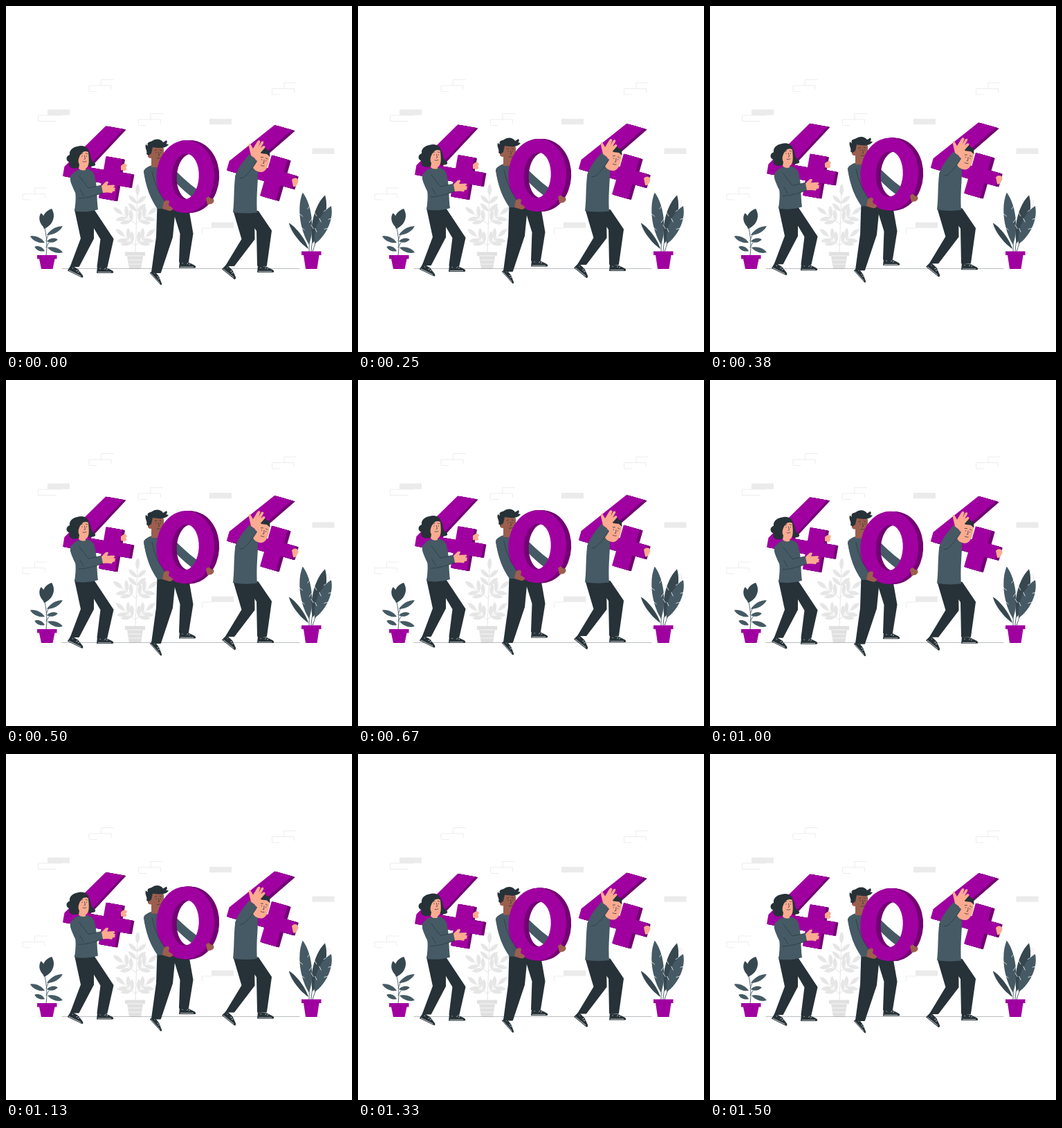
Write an HTML page that moves like this. It is 500 px wide and 500 px high and loops after 1.54 s.

```html
<!DOCTYPE html>
<html lang="en">
<head>
<meta charset="utf-8">
<title>404</title>
<style>
  html, body { margin: 0; width: 100%; height: 100%; overflow: hidden; background: #fff; }
  svg { display: block; width: 100vw; height: 100vh; }
  .purple { fill: #a000a0; }
  .shade { fill: #730073; }
  .cloth { fill: #455a64; }
  .slate { fill: #37474f; }
  .dark { fill: #263238; }
  .skin { fill: #fcab90; }
  .brown { fill: #9c5f4e; }
  .brick { fill: #ebebeb; }
  .pale { fill: #e6e6e6; }
  .pot { fill: #e0e0e0; }
  .leg { fill: #263238; stroke: #263238; stroke-width: 2; stroke-linejoin: round; }
  .wall, .fold, .line, .stem, .floor, .palestem, .cut { fill: none; stroke-linecap: round; stroke-linejoin: round; }
  .wall { stroke: #e6e6e6; stroke-width: .7; }
  .fold { stroke: #263238; stroke-width: .6; }
  .line { stroke: #263238; stroke-width: .7; }
  .stem { stroke: #455a64; stroke-width: .9; }
  .palestem { stroke: #e6e6e6; }
  .floor { stroke: #a7adb0; stroke-width: .8; }
  .cut { stroke: #fff; stroke-width: .7; }
</style>
</head>
<body>
<svg viewBox="0 0 500 500"><g id="scene"></g><g id="crew"></g></svg>
<script>
const LOOP = 1540, LIFT = 6, PHASE = 0.23;

const path = (cls, d, at = "") => `<path class="${cls}" d="${d}" transform="${at}" fill-rule="evenodd"/>`;
const repeat = (n, make) => Array.from({ length: n }, (_, i) => make(i)).join("");
const oval = (rx, ry) => `M${-rx} 0a${rx} ${ry} 0 1 1 ${2 * rx} 0a${rx} ${ry} 0 1 1 ${-2 * rx} 0Z`;

// Room
const brick = (x, y) => path("brick", `M${x} ${y}h32v8.300h-32z`);

// Two staggered bricks in outline, the upper one shifted right.
const outline = (x, y) => path("wall", `M${x} ${y + 16.5}V${y + 8.5}H${x + 17.5}V${y}H${x + 35}M${x + 17.5} ${y + 8.5}H${x + 32}V${y + 14}M${x + 1} ${y + 17}h10`);

function pot(cls, x, y, w, h) {
  return path(cls, `M${x} ${y}h${w}v5.500h-3l-3 ${h - 5.5}h${12 - w}l-3 ${5.5 - h}h-3z`);
}

// Plants
function leaf(cls, x, y, angle, len, w, cuts = 0) {
  const at = `translate(${x} ${y}) rotate(${angle})`;
  const nicks = repeat(cuts, i => {
    const side = i % 2 ? 1 : -1;
    return path("cut", `M${len * (.35 + i * .13)} ${side * w * .78}l${-len * .06} ${-side * w * .4}`, at);
  });
  return path(cls, `M0 0C${len * .3} ${-w} ${len * .75} ${-w} ${len} 0C${len * .75} ${w} ${len * .3} ${w} 0 0Z`, at) + nicks;
}

// A twig with leaf pairs on the part beyond `from`, and one leaf at the tip.
function twig(x, y, angle, len, pairs, from = .3) {
  const a = angle * Math.PI / 180, dx = Math.cos(a) * len, dy = Math.sin(a) * len;
  return path("palestem", `M${x} ${y}l${dx} ${dy}`) +
    leaf("pale", x + dx, y + dy, angle, 17, 4) +
    repeat(pairs * 2, i => {
      const t = from + (1 - from) * (i >> 1) / pairs;
      return leaf("pale", x + dx * t, y + dy * t, angle + (i % 2 ? 48 : -48), 17, 4);
    });
}

const palePlant = () =>
  twig(187, 356, -88, 82, 2, .72) +
  [-1, 1].map(side => {
    const turn = deg => -90 + side * deg;
    return twig(187, 315, turn(53), 23, 2) + twig(187, 346, turn(50), 20, 2);
  }).join("") +
  pot("pot", 172, 355.5, 29, 24.5) +
  repeat(3, i => path("cut", `M${176 + i} ${361 + i * 6}H${197 - i}`));

const leftPlant = () =>
  path("stem", "M58 361Q61 340 55 316M58 349Q62 340 66 339M58 339Q61 328 66 325") +
  leaf("cloth", 59, 331, -29, 26, 4.5) + leaf("cloth", 56, 342, -156, 23, 4.5) +
  leaf("cloth", 59, 340, -10, 16, 4) + leaf("cloth", 56, 354, -157, 16, 4) +
  leaf("cloth", 60, 349, 18, 23, 4.5) +
  leaf("slate", 54, 319, -100, 20, 5) + leaf("slate", 55, 322, -69, 31, 10) +
  pot("purple", 45, 360, 28.5, 20);

const rightPlant = () =>
  path("stem", "M438 355Q439 345 437 335M441 355Q442 340 445 330M443 355Q447 342 451 332") +
  leaf("cloth", 438, 345, -97, 76, 11, 4) + leaf("slate", 443, 343, -75.5, 72, 11, 4) +
  leaf("cloth", 446, 344, -66.5, 60, 11, 4) + leaf("slate", 437, 351, -127, 47, 5) +
  pot("purple", 427, 354.5, 28.5, 25.5);

// Digits: the side is the face repeated along its depth.
function solid(d, at, depth) {
  const layer = (cls, x) => path(cls, d, `${at} translate(${x} 0)`);
  return repeat(depth, i => layer("shade", depth - i)) + layer("purple", 0);
}
const four = (x, y, tilt, depth) =>
  solid("M0 0H26L-15 63H8V43H32V62H49V81.500H32V104H8V82H-48.500V68Z", `translate(${x} ${y}) rotate(${tilt})`, depth);
const zero = () => solid(oval(42, 52.5) + oval(19.5, 33), "translate(259.200 246.500) rotate(3)", 7);

// People; a joint is [x, y, half width].
function leg(...joints) {
  const left = joints.map(([x, y, w]) => `${x - w + 1} ${y}`);
  const right = joints.map(([x, y, w]) => `${x + w - 1} ${y}`).reverse();
  return path("leg", `M${[...left, ...right].join("L")}Z`);
}
function shoe(x, y, tilt, thick = 1) {
  const at = `translate(${x} ${y}) rotate(${tilt}) scale(1 ${thick})`;
  return path("dark", "M1 0L13 1 23 6Q26 9.500 22 9.500H0Z", at) +
    path("cut", "M5 3h.5M12 4l1-1.500M15 5l1-1.500M2 8.300H21", at + " scale(.98)");
}
const face = (x, y, tilt) =>
  path("line", "M-5-4l3-1M2-5l3 .7M-3-1.500v.8M3.500-1.500v.8M.5-2l1 5-1.500.5M-2 7q2.500 1 5-.5", `translate(${x} ${y}) rotate(${tilt})`);

const woman = () =>
  four(144, 173.5, 10, 4) +
  path("skin", "M166 231Q171 226 174 229 176 231 173 233 176 236 172 238L166 237Z") +
  leg([119, 294, 8], [146, 337, 9.5], [139, 377, 7.5]) +
  leg([113, 294, 14], [117.5, 336, 9.5], [99.5, 376, 6.5]) +
  shoe(93, 374, 26) + shoe(131, 376.5, 0) +
  path("cloth", "M93 248C96 239 105 235 114 235 124 236 128 241 129 250 132 263 131 281 133 294Q118 299 99 296.500C101 282 101 275 100 268 96 260 92 254 93 248Z") +
  path("dark", "M103 203C112 200 119 204 120 211 124 215 121 222 127 226 132 229 128 233 121 231L104 234C95 237 89 231 92 226 86 224 86 217 92 215 91 208 97 204 103 203Z") +
  path("skin", "M105 213C108 206 118 207 119 212 120 222 121 232 115 235V237Q109 239 105 235L106 229C103 224 104 218 105 213Z") +
  path("dark", "M103 205C113 201 119 206 119 211 113 208 109 212 106 218 103 225 106 230 102 232 95 233 94 207 103 205Z") +
  face(113, 218, 0) +
  path("cloth", "M93 249C92 242 101 239 107 247L119 263 138 259 140.500 270C129 274 116 279 107 277.500 100 273 95 260 93 249Z") +
  path("fold", "M106 246L119 263 138 259M107 265l5 9M105 278Q118 278 140 270") +
  path("skin", "M138 260L144 254Q148 253 148 255L146 259 156 258.500Q159 260 155 262 160 263 157 265 159 268 154 268L153 270.500Q147 269 140 270Z");

const middle = () =>
  leg([252, 292, 12], [261, 329, 9.5], [257, 369.5, 7]) +
  leg([232, 288, 13.5], [229, 334, 12], [217, 385, 7]) +
  shoe(213, 381, 48, .75) + shoe(250, 369, 0) +
  path("cloth", "M199 239C202 233 208 230 214 230L242 238 243 293 219 293C211 283 202 262 199 239Z") +
  path("cloth", "M235 231C246 237 257 251 272 262L294 279 289 288C272 280 260 270 244 254Z") +
  path("brown", "M206 206C213 198 225 200 228 206 229 218 226 230 221 233H210V220Q204 220 205 215 206 212 208 214Z") +
  path("dark", "M206 216L203 214C205 209 200 206 202 200L205 202C203 196 208 197 211 195 217 191 224 192 227 197L232 194Q234 198 231 199L235 200C231 206 222 206 212 204L210 213Z") +
  face(220, 213, 0) + zero() +
  path("cloth", "M199 239C200 233 208 232 211 238L219 266 231 284 226 293C214 290 205 274 199 239Z") +
  path("fold", "M211 239Q215 262 230 283") +
  path("brown", "M228 283Q233 279 236 282L235 288 241 292Q241 296 236 296L226 293ZM289 278Q293 273 296 278L300 279Q302 283 297 286L291 287Z");

const last = () =>
  four(388, 172, 16, 5) +
  path("skin", "M413 251Q417 247 421 249.500 424 253 421 257 419 262 415 261Z") +
  leg([354, 297, 11], [373, 325, 11], [370, 375, 7]) +
  leg([344, 298, 15], [350, 337, 9.5], [324, 375, 6.5]) +
  shoe(318, 373, 39) + shoe(363, 375.5, 0) +
  path("cloth", "M331 248C334 237 342 227 351 221L363 232C366 246 361 270 363 298.500Q346 301 328 298C330 282 329 266 331 248Z") +
  path("skin", "M362 216C368 208 380 209 381 216 381 229 376 239 370 240 361 241 354 233 357 227Z") +
  path("dark", "M366 210L375 205 377 208 381 209 381.500 218 377 214 369 213Z") +
  face(372, 224, 16) +
  path("cloth", "M331 246C336 232 345 222 352 214L363 224C358 233 350 243 344 248 338 250 331 249 331 246Z") +
  path("fold", "M362 225Q353 240 343 248L338 249") +
  path("skin", "M354 216L351 203Q350 198 353 199L357 206 363 196Q366 192 367.500 196L365 203 369 196Q373 194 372 198L368 205 372 202Q375.500 202 374 205L367 213 362 222Z");

const crew = document.getElementById("crew");
document.getElementById("scene").innerHTML =
  brick(60, 149.5) + brick(294, 163) + brick(442.5, 205.5) + brick(297, 312.5) +
  outline(120, 106.5) + outline(191.5, 155.5) + outline(384.5, 111) + outline(24, 263) +
  path("wall", "M46.500 166.500V158H80M46.500 166.500H72M283.500 329V321H297M451 281H467.500V289") +
  palePlant() + path("floor", "M81 379.500H424") + leftPlant() + rightPlant();
crew.innerHTML = woman() + middle() + last();

function draw(now) {
  const turn = (now % LOOP) / LOOP * 2 * Math.PI + PHASE;
  const y = -LIFT * (1 - Math.cos(turn)) / 2;
  crew.setAttribute("transform", `translate(0 ${y.toFixed(3)})`);
  requestAnimationFrame(draw);
}
draw(0);
</script>
</body>
</html>
```
